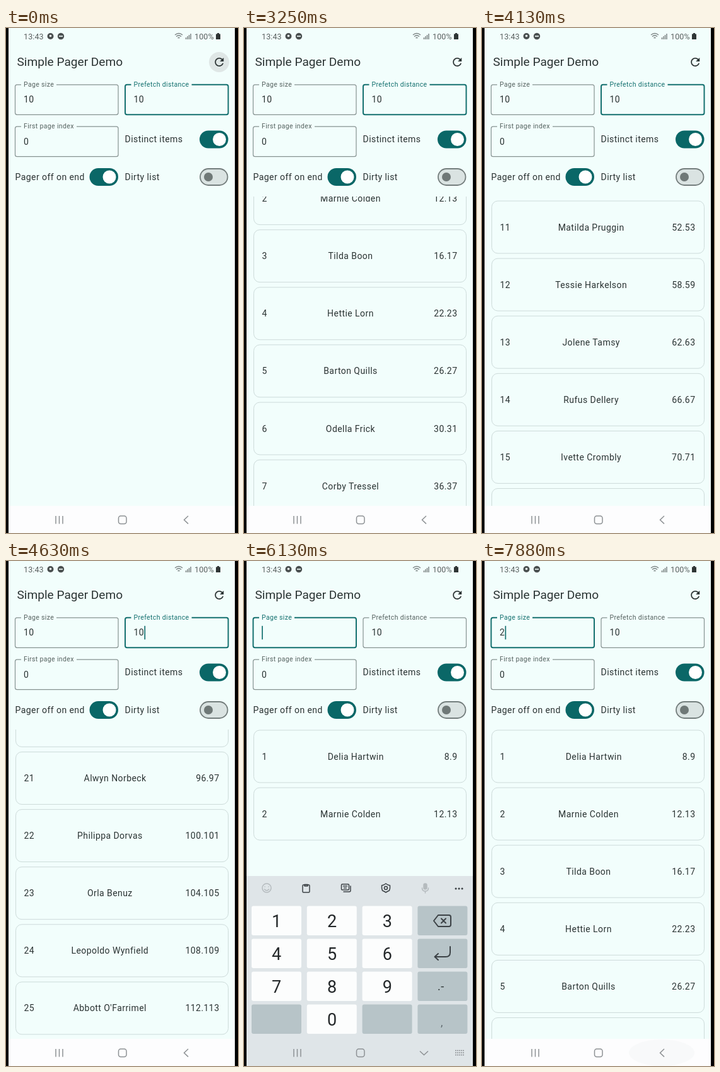
Write an HTML page that moves like this. It is 368 px wide and 800 px high and loops after 8000 ms.

```html
<!DOCTYPE html>
<html lang="en">
<head>
<meta charset="utf-8">
<title>Simple Pager Demo</title>
<style>
  html, body { margin: 0; width: 100%; height: 100%; overflow: hidden; background: #000; }
  #stage { position: relative; width: 368px; height: 800px; overflow: hidden;
    font: 14px Roboto, sans-serif; color: #2b3333; }
  svg { position: absolute; left: 0; top: 0; }
  svg text { fill: #2b3333; letter-spacing: .44px; }
  #list { position: absolute; left: 4px; top: 267px; width: 359px; height: 490px; overflow: hidden; }
  .row { position: absolute; left: 10.5px; top: 0; width: 338px; height: 83.5px; box-sizing: border-box;
    padding: 0 13px; border: 1.3px solid #cddbda; border-radius: 10px;
    display: flex; justify-content: space-between; align-items: center;
    letter-spacing: .44px; white-space: nowrap; }
  .box { fill: none; stroke: #869291; stroke-width: 1.2; }
  svg .label { font-size: 10.5px; letter-spacing: .35px; fill: #566260; }
  .focus .box { stroke: #14706f; stroke-width: 2; }
  svg .focus .label { fill: #14706f; }
  .caret { fill: #14706f; }
  .line { fill: none; stroke: #3c4246; stroke-width: 1.5; stroke-linecap: round; stroke-linejoin: round; }
  .nav { fill: none; stroke: #8d9194; stroke-width: 1.5; }
  svg .digit { font-size: 27px; letter-spacing: 0; text-anchor: middle; fill: #24282a; }
  svg .status { font-size: 12.5px; letter-spacing: .1px; fill: #5a6060; }
</style>
</head>
<body>
<div id="stage">
  <svg width="368" height="800">
    <rect x="4" width="359" height="800" fill="#f2fefc"/>
    <text class="status" x="28" y="17.5">13:43</text>
    <circle cx="70.5" cy="13" r="5" fill="#4a5050"/><circle cx="70.5" cy="12.5" r="1.8" fill="#f2fefc"/>
    <circle cx="87" cy="13" r="5.2" fill="#4a5050"/><path d="M84 13h6" stroke="#f2fefc" stroke-width="1.6"/>
    <path d="M268 11q6 -5 12 0M270 13.5q4 -3.500 8 0M272.500 16q1.500 -1.500 3 0" fill="none" stroke="#7c8484" stroke-width="1.5"/>
    <path d="M285.500 18v-3M288 18v-5M290.500 18v-7M293 18v-9" stroke="#7c8484" stroke-width="1.5"/>
    <text class="status" x="299" y="17.500">100%</text>
    <path d="M333 9.500h2v-1.500h3v1.500h2v8.500h-7z" fill="#2f3535"/>
    <text x="17.500" y="60" style="font-size:19.100px;letter-spacing:0">Simple Pager Demo</text>
    <circle id="ripple" cx="338" cy="54" r="16" fill="#dfe7e6"/>
    <path transform="translate(327.800 43.500) scale(.873)" fill="#2b3333" d="M17.650 6.350C16.200 4.900 14.210 4 12 4c-4.420 0-7.990 3.580-7.990 8s3.570 8 7.990 8c3.730 0 6.840-2.550 7.730-6h-2.080c-.820 2.330-3.040 4-5.650 4-3.310 0-6-2.690-6-6s2.690-6 6-6c1.660 0 3.140.690 4.220 1.780L13 11h7V4z"/>
    <g id="fields"></g>
    <text x="188.500" y="181">Distinct items</text>
    <text x="14.500" y="241">Pager off on end</text>
    <text x="188.500" y="241">Dirty list</text>
    <g id="switches"></g>
  </svg>
  <div id="list"></div>
  <svg width="368" height="800">
    <rect x="4" y="757" width="359" height="43" fill="#fdfdfe"/>
    <ellipse id="backRipple" cx="285" cy="779" rx="52" ry="21" fill="#eef0f0"/>
    <g id="keyboard">
      <rect x="4" y="499" width="359" height="301" fill="#dfe5e8"/>
      <g class="line">
        <g opacity=".25"><circle cx="36" cy="518" r="7"/><path d="M33 516h.1M39 516h.1M32.500 520q3.500 4 7 0"/></g>
        <rect x="93" y="513" width="11" height="12" rx="1.500"/><path d="M96 512.500h5v2.500h-5z"/>
        <rect x="154.500" y="512" width="12" height="9" rx="1.500"/><path d="M157.500 515h6M158.500 518h4M169 515v7q0 2 -2 2h-9"/>
        <path d="M225 511l3 2 3.500 1v4.500l-1 3.500 -3 1.500 -2.500 1.500 -2.500 -1.500 -3 -1.500 -1 -3.500v-4.500l3.500 -1z"/><circle cx="225" cy="518" r="2.500"/>
        <g opacity=".25"><rect x="285" y="511" width="5" height="9" rx="2.500" fill="#3c4246"/><path d="M282.500 518q0 5 5 5t5 -5M287.500 523v3"/></g>
        <path d="M336 519h.1M341 519h.1M346 519h.1" stroke-width="3"/>
      </g>
      <g id="keys"></g>
      <g class="line" stroke-width="2">
        <path d="M308 561h17q3 0 3 3v12q0 3 -3 3h-17l-7 -9zM313 566.500l7 7M320 566.500l-7 7" style="stroke-width:2"/>
        <path d="M327 611v9q0 7 -7 7h-17M308 622l-5.500 5 5.500 5" style="stroke-width:2"/>
      </g>
      <text x="307" y="680" style="font-size:18px">.-</text>
      <text x="312" y="737" style="font-size:17px;fill:#5d676b">,</text>
      <path class="nav" stroke-dasharray="2 1" d="M335 775.500h15M335 779h15M335 782.500h15"/>
    </g>
    <g class="nav">
      <path d="M79 773v12.500M84.500 773v12.500M90 773v12.500"/>
      <rect x="178.500" y="773" width="12.500" height="12.500" rx="3.500"/>
      <path id="back" d="M289 773l-6.500 6.200 6.500 6.200"/>
    </g>
  </svg>
</div>
<script>
const $ = id => document.getElementById(id);
const LOOP = 8000, STEP = 125, PITCH = 91.1;

const names = ["Delia Hartwin", "Marnie Colden", "Tilda Boon", "Hettie Lorn", "Barton Quills",
  "Odella Frick", "Corby Tressel", "Nessa Varlow", "Wilton Dasker", "Thelma Grovin",
  "Matilda Pruggin", "Tessie Harkelson", "Jolene Tamsy", "Rufus Dellery", "Ivette Crombly",
  "Orson Pellman", "Gladys Werrin", "Lorna Stebbing", "Percy Hollun", "Nadine Fawkley",
  "Alwyn Norbeck", "Philippa Dorvas", "Orla Benuz", "Leopoldo Wynfield", "Abbott O'Farrimel",
  "Wanda Sprill", "Hector Blayne", "Mabel Trosky", "Simon Duckwell"];

const rows = names.map((name, i) => {
  const n = i + 1;
  const low = 4 * n + 4 + 2 * [3, 6, 11, 15].filter(k => n > k).length;
  const row = document.createElement("div");
  row.className = "row";
  row.innerHTML = `<span>${n}</span><span>${name}</span><span>${low}.${low + 1}</span>`;
  $("list").append(row);
  return row;
});

const field = (x, y, label, gap, value) => `<g>
  <rect class="box" x="${x}" y="${y}" width="163.5" height="47.5" rx="3"/>
  <rect x="${x + 9.5}" y="${y - 2}" width="${gap}" height="4" fill="#f2fefc"/>
  <text class="label" x="${x + 13.5}" y="${y + 3}">${label}</text>
  <text class="value" x="${x + 13.5}" y="${y + 28.5}">${value}</text>
  <rect class="caret" y="${y + 13}" width="1.7" height="21.5"/></g>`;
$("fields").innerHTML = field(14.5, 89.8, "Page size", 56, "10") +
  field(189, 89.8, "Prefetch distance", 96, "10") + field(14.5, 156.2, "First page index", 88, "0");
const [sizeField, prefetchField, indexField] = $("fields").children;

const toggle = (x, y, on) => on
  ? `<rect x="${x}" y="${y}" width="45.5" height="28" rx="14" fill="#0a6767"/><circle cx="${x + 31.5}" cy="${y + 14}" r="10.5" fill="#fff"/>`
  : `<rect x="${x + 1}" y="${y + 1}" width="43.5" height="26" rx="13" fill="#dae3e2" stroke="#737d7c" stroke-width="1.8"/><circle cx="${x + 14}" cy="${y + 14}" r="7" fill="#6f7877"/>`;
$("switches").innerHTML = toggle(307, 162.5, true) + toggle(132.5, 222, true) + toggle(307, 222, false);

const keyFace = (c, r) => c == 3 || (r == 3 && c != 1) ? "#b7c4c8" : "#fcfdfd";
for (let i = 0; i < 16; i++) {
  const c = i % 4, r = i >> 2, x = 12 + c * 87.8, y = 546.5 + r * 52;
  const digit = r == 3 ? (c == 1 ? 0 : "") : c < 3 ? r * 3 + c + 1 : "";
  $("keys").innerHTML += `<rect x="${x}" y="${y}" width="79" height="46.5" rx="3"/>
    <text class="digit" x="${x + 39.7}" y="${y + 33.5}">${digit}</text>`;
}
const keyRects = [...$("keys").querySelectorAll("rect")];

const clamp = v => Math.min(1, Math.max(0, v));
const ease = v => 1 - (1 - clamp(v)) ** 2;
const within = (t, a, b) => t >= a && t < b;

// Two flings, each a few points joined by straight runs
const path = [[3180, 0], [3250, 130.5], [3375, 305], [3500, 460], [3625, 592], [3750, 701], [3875, 780],
  [4000, 820], [4080, 820], [4125, 905], [4250, 1150], [4375, 1390], [4500, 1605], [4625, 1787.5],
  [4750, 1900], [4875, 1950]];
function scrollAt(t) {
  if (t >= 5750 || t <= path[0][0]) return 0;
  const i = path.findIndex(p => p[0] >= t);
  if (i < 0) return path.at(-1)[1];
  const [t0, y0] = path[i - 1], [t1, y1] = path[i];
  return y0 + (y1 - y0) * (t - t0) / (t1 - t0);
}

function caretOn(t) {
  if (t < 5000) return [250, 1250, 2250, 3375, 4375].some((s, i) => within(t, s, s + (i == 2 ? 625 : 500)));
  const last = [6625, 6000, 5625, 5125, 5000].find(s => t >= s);
  return Math.floor((t - last) / 500) % 2 == 0;
}

function setField(f, x, text, focused, caret) {
  f.classList.toggle("focus", focused);
  f.querySelector(".value").textContent = text;
  const bar = f.querySelector(".caret");
  bar.setAttribute("x", x + 8.3 * text.length);
  bar.setAttribute("opacity", focused && caret ? 1 : 0);
}

function draw(t) {
  const editing = t >= 5000, caret = caretOn(t);
  const size = t < 5625 ? "10" : t < 6000 ? "1" : t < 6625 ? "" : "2";
  setField(sizeField, 28.2, size, editing, caret);
  setField(prefetchField, 202.8, "10", !editing, caret);
  setField(indexField, 28.2, "0", false, false);

  const loading = t < 125 || within(t, 1500, 1750);
  const count = loading ? 0 : within(t, 5750, 6875) ? 2 : rows.length;
  const scroll = scrollAt(t);
  rows.forEach((row, i) => {
    const y = i * PITCH - scroll + .5;
    row.style.display = i < count && y > -90 && y < 490 ? "flex" : "none";
    row.style.transform = `translateY(${y}px)`;
  });

  $("ripple").setAttribute("opacity", t < 1000 ? clamp(1 - t / 375) : clamp(1 - Math.abs(t - 1600) / 280));
  $("backRipple").setAttribute("opacity", t < 7500 ? 0 : clamp(1.2 - (t - 7500) / 450));

  const open = ease((t - 4950) / 425) - ease((t - 7450) / 425);
  $("keyboard").setAttribute("transform", `translate(0 ${301 * (1 - open)})`);
  $("keyboard").setAttribute("opacity", open > 0 ? 1 : 0);
  $("back").setAttribute("d", within(t, 5125, 7625) ? "M279 776.500l6.500 6 6.500 -6" : "M289 773l-6.500 6.200 6.500 6.200");

  const pressed = within(t, 5625, 5750) || within(t, 6000, 6125) ? 3 : within(t, 6625, 6750) ? 1 : -1;
  keyRects.forEach((k, i) => k.setAttribute("fill", i == pressed ? "#a3b0b5" : keyFace(i % 4, i >> 2)));
}

function tick() {
  const t = performance.now() % LOOP;
  draw(Math.floor(t / STEP) * STEP);
  requestAnimationFrame(tick);
}
tick();
</script>
</body>
</html>
```
